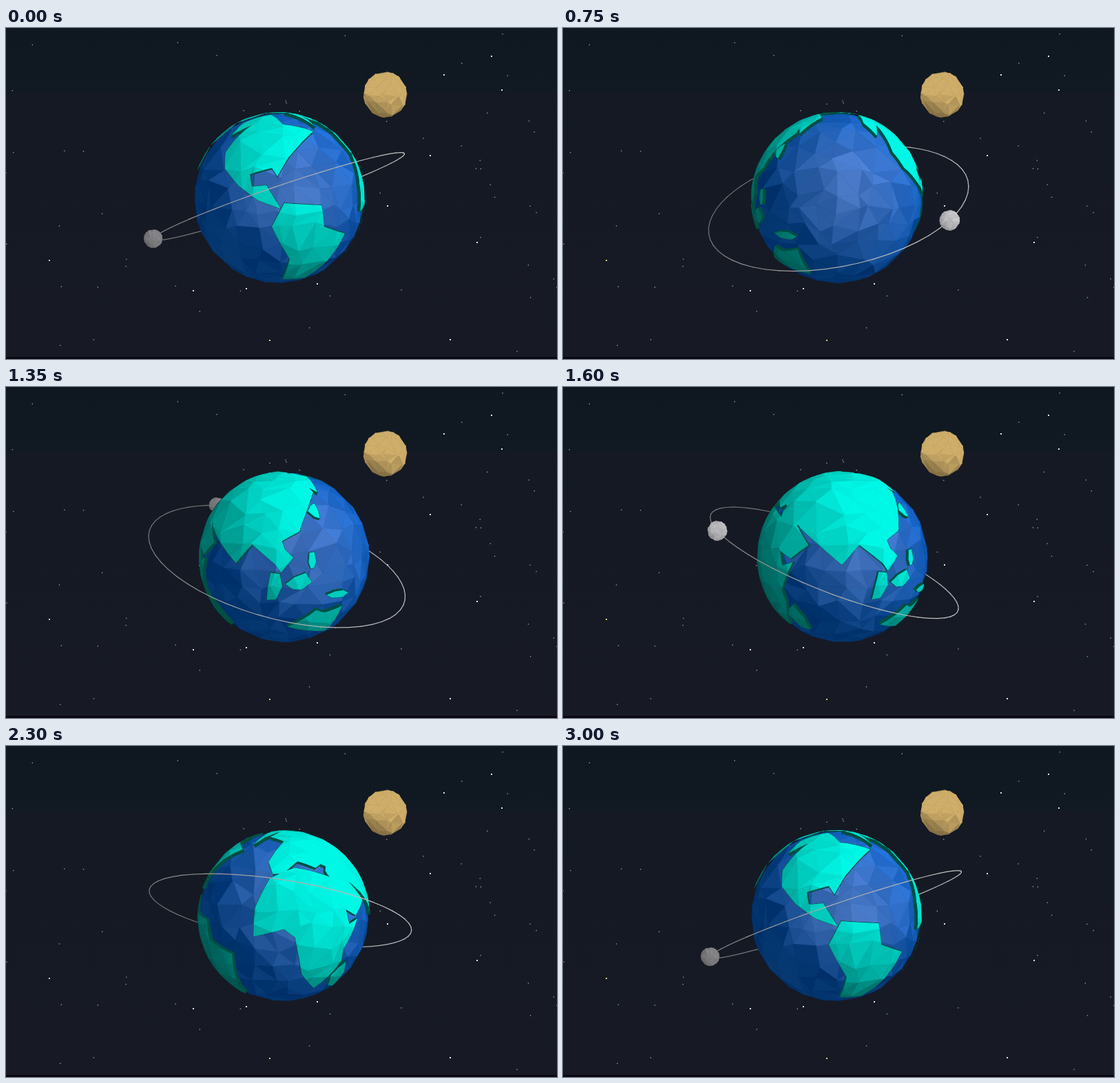
These frames come from a looping animation (800 by 480 pixels, 3050 ms). An HTML page with a canvas:

```html
<!DOCTYPE html>
<html lang="en">
<head>
<meta charset="utf-8">
<title>Low-poly Earth</title>
<style>
html, body { margin: 0; width: 100%; height: 100%; overflow: hidden; background: #131922; }
canvas { display: block; }
</style>
</head>
<body>
<canvas id="stage" width="800" height="480"></canvas>
<script>
const ctx = document.getElementById('stage').getContext('2d');
const { sin, cos, sqrt, min, max, PI, hypot } = Math;
const LOOP = 3050, TURN = 3000, STEP = 50;
const DIST = 950, ELEV = 0.118, CY = 247;
const SEA = 120.5, LAND = 124;
const RING = { x: 397, r: 189, tilt: 0.38, phase: -2 * PI / 3 };
const SUN = [0.55, 0.52, 0.65];

const dot = (a, b) => a[0] * b[0] + a[1] * b[1] + a[2] * b[2];
const scale = (p, k) => p.map(v => v * k);
const norm = p => scale(p, 1 / hypot(...p));
const mix = (a, b, k) => a.map((v, i) => v + (b[i] - v) * k);
const clamp = (v, lo, hi) => max(lo, min(hi, v));
const rgb = (r, g, b) => `rgb(${r | 0},${g | 0},${b | 0})`;
const noise = (p, seed) => {
  const v = sin(dot(p, [12.99, 78.23, 37.72]) + seed) * 43758.5;
  return v - Math.floor(v) - 0.5;
};
const pairs = text => text.split(' ').map(s => s.split(',').map(Number));

// Group space <-> camera space, for turn angle a
const cE = cos(ELEV), sE = sin(ELEV);
function toCam([x, y, z], a) {
  const c = cos(a), s = sin(a), depth = z * c - x * s;
  return [x * c + z * s, y * cE - depth * sE, depth * cE + y * sE];
}
function fromCam([x, y, z], a) {
  const c = cos(a), s = sin(a), depth = z * cE - y * sE;
  return [x * c - depth * s, y * cE + z * sE, x * s + depth * c];
}
function toScreen([x, y, z], cx) {
  const k = DIST / (DIST - z);
  return [cx + x * k, CY - y * k];
}
const angleAt = ms => 2 * PI * ms / TURN;
const earthX = a => 401 + 6 * sin(a + RING.phase);

// Faceted sphere: a subdivided octahedron with shifted corners
function sphere(levels, jitter) {
  const faces = [];
  const shift = p => norm(p.map((v, i) => v + jitter * noise(p, i * 7 + 1)));
  function split(a, b, c, n) {
    if (!n) {
      const pts = [a, b, c].map(shift);
      const mid = norm(pts[0].map((v, i) => v + pts[1][i] + pts[2][i]));
      faces.push({ pts, mid, rnd: noise(mid, 5) });
      return;
    }
    const ab = norm(mix(a, b, 0.5)), bc = norm(mix(b, c, 0.5)), ca = norm(mix(c, a, 0.5));
    split(a, ab, ca, n - 1);
    split(ab, b, bc, n - 1);
    split(ca, bc, c, n - 1);
    split(ab, bc, ca, n - 1);
  }
  for (const x of [-1, 1]) for (const y of [-1, 1]) for (const z of [-1, 1]) {
    const rest = [[0, y, 0], [0, 0, z]];
    if (x * y * z < 0) rest.reverse();
    split([x, 0, 0], ...rest, levels);
  }
  return faces;
}
const globe = sphere(3, 0.13), pebble = sphere(2, 0.3);

function polygon(points, color) {
  ctx.beginPath();
  points.forEach(p => ctx.lineTo(p[0], p[1]));
  ctx.closePath();
  ctx.fillStyle = ctx.strokeStyle = color;
  ctx.lineWidth = 0.7;
  ctx.fill();
  ctx.stroke();
}
function drawFaces(mesh, place, color) {
  for (const { pts, mid, rnd } of mesh) {
    const [a, b, c] = pts.map(place);
    const area = (b[0] - a[0]) * (c[1] - a[1]) - (b[1] - a[1]) * (c[0] - a[0]);
    if (area < 0) polygon([a, b, c], color(mid, rnd));
  }
}

// Lays a screen outline, seen at a given time, back onto the sphere
function outline(ms, points) {
  const a = angleAt(ms), cx = earthX(a);
  const pts = points.map(([sx, sy]) => {
    let k = 1, p;
    for (let i = 0; i < 6; i++) {
      const x = (sx - cx) / k, y = (CY - sy) / k;
      p = [x, y, sqrt(max(0, LAND * LAND - x * x - y * y))];
      k = DIST / (DIST - p[2]);
    }
    return fromCam(norm(p), a);
  });
  return pts.flatMap((p, i) =>
    [0, 0.25, 0.5, 0.75].map(k => norm(mix(p, pts[(i + 1) % pts.length], k))));
}
const coast = (ms, text) => outline(ms, pairs(text));
// Ragged island of six corners
const island = (ms, x, y, w, h) => outline(ms, Array.from({ length: 6 }, (_, i) => {
  const k = 1 + 0.6 * noise([x, y, i], 3), t = i * PI / 3;
  return [x + w * k * cos(t), y + h * k * sin(t)];
}));

const lands = [
  // North America, South America, Greenland
  coast(0, '327,156 345,138 385,126 402,140 446,150 410,188 394,215 386,203 354,212 357,230 378,228 399,262 366,250 338,229 318,204 319,180 345,150 357,141'),
  coast(0, '386,288 404,254 458,257 462,288 492,298 434,362 402,364 412,335'),
  coast(2650, '398,124 416,123 406,143'),
  // Africa, Madagascar
  coast(2000, '300,230 322,190 355,176 404,192 426,263 446,256 418,300 420,318 392,353 360,330 338,275 325,262 298,269'),
  island(2000, 425, 337, 12, 16),
  // Europe with Arabia, Asia, Far East
  coast(2000, '327,184 331,167 405,126 470,140 492,162 482,208 440,201 467,229 442,251 420,241 398,182 408,167 384,177 363,167 338,184'),
  coast(1600, '345,205 322,165 360,131 440,130 478,152 487,208 470,222 480,246 474,264 430,229 405,258'),
  coast(1100, '300,190 350,131 413,130 407,153 386,140 391,162 358,184 358,207 327,225 343,246 328,266 312,232'),
  // Pacific islands, Australia
  island(1100, 387, 180, 8, 12),
  island(1100, 369, 254, 6, 14),
  island(1100, 322, 286, 9, 20),
  island(1100, 350, 283, 15, 13),
  island(1100, 417, 304, 20, 6),
  coast(1100, '355,345 385,325 400,330 432,323 424,358 395,355')
];

function seaColor(n, rnd) {
  const d = max(0, dot(n, SUN) + rnd * 0.2), gloss = d * n[2] * n[2], v = rnd * 10;
  return rgb(2 + 15 * d + 70 * gloss + v, 52 + 52 * d + 28 * gloss + v, 110 + 102 * d + v);
}
function landColor(n, rnd) {
  const d = dot(n, SUN) + rnd * 0.13;
  const g = min(248, 118 + (d > 0 ? 145 : 60) * d);
  return rgb(0, g, g * 0.93);
}

function drawWalls(a, cx, front) {
  const edge = LAND * LAND / DIST;
  for (const land of lands) {
    const pts = land.map(p => toCam(p, a));
    pts.forEach((p, i) => {
      const q = pts[(i + 1) % pts.length], z = (p[2] + q[2]) / 2 * LAND;
      if (z > edge !== front || z < -40) return;
      const quad = [[p, SEA - 1], [q, SEA - 1], [q, LAND], [p, LAND]];
      polygon(quad.map(([v, r]) => toScreen(scale(v, r), cx)), '#004f43');
    });
  }
}
// Visible land tops; points beyond the horizon are pulled onto it
function landPath(a, cx) {
  const edge = LAND * LAND / DIST, rim = sqrt(LAND * LAND - edge * edge);
  const path = new Path2D();
  for (const land of lands) {
    const pts = land.map(p => scale(toCam(p, a), LAND));
    if (pts.every(p => p[2] < edge)) continue;
    pts.forEach((p, i) => {
      if (p[2] < edge) {
        const k = rim / hypot(p[0], p[1]);
        p = [p[0] * k, p[1] * k, edge];
      }
      path[i ? 'lineTo' : 'moveTo'](...toScreen(p, cx));
    });
    path.closePath();
  }
  return path;
}
function drawEarth(a) {
  const cx = earthX(a);
  const on = r => p => toScreen(scale(toCam(p, a), r), cx);
  const lit = color => (mid, rnd) => color(toCam(mid, a), rnd);
  drawWalls(a, cx, false);
  drawFaces(globe, on(SEA + 1), lit(seaColor));
  drawWalls(a, cx, true);
  ctx.save();
  ctx.clip(landPath(a, cx));
  drawFaces(globe, on(LAND + 0.5), lit(landColor));
  ctx.restore();
}

function ringPoint(g, a) {
  const { r, tilt, phase } = RING, u = cos(g) * cos(tilt), v = sin(g);
  return toCam([
    r * (u * sin(phase) + v * cos(phase)),
    -r * sin(tilt) * cos(g),
    r * (u * cos(phase) - v * sin(phase))
  ], a);
}
function drawRing(a, front) {
  const n = 60;
  ctx.lineWidth = 1.2;
  ctx.lineCap = 'round';
  for (let i = 0; i < n; i++) {
    const p = ringPoint(2 * PI * i / n, a), q = ringPoint(2 * PI * (i + 1) / n, a);
    if (p[2] + q[2] > 0 !== front) continue;
    const g = 155 + p[0] * 0.2 + p[2] * 0.1;
    ctx.strokeStyle = rgb(g, g, g);
    ctx.beginPath();
    ctx.moveTo(...toScreen(p, RING.x));
    ctx.lineTo(...toScreen(q, RING.x));
    ctx.stroke();
  }
}

// One lap per turn, slow at the loop point and fast halfway
const moonAngle = a => PI / 4 + a - 0.82 * sin(a) - 0.16 * (1 - cos(a));
function drawMoon(p, a) {
  const [x, y] = toScreen(p, RING.x), r = 12.6 * DIST / (DIST - p[2]);
  const base = clamp(190 + dot(p, SUN) * 0.6, 130, 198);
  drawFaces(pebble, v => {
    const c = toCam(v, a);
    return [x + c[0] * r, y - c[1] * r];
  }, (mid, rnd) => {
    const g = base * (0.86 + 0.16 * dot(toCam(mid, a), SUN) + rnd * 0.1);
    return rgb(g, g, g + 3);
  });
}
function drawSun() {
  drawFaces(pebble, p => [550.5 + 31.5 * p[0], 96.5 - 33 * p[1]], (n, rnd) => {
    const f = clamp(1.04 + 0.45 * n[1] + 0.12 * n[0] + rnd * 0.2, 0.66, 1);
    return rgb(207 * f, 174 * f, 106 * f);
  });
}

let seed = 11;
const random = () => (seed = seed * 16807 % 2147483647) / 2147483647;
const smallStars = Array.from({ length: 60 }, () => [random() * 800, random() * 470]);
const bigStars = pairs('720,90 705,41 636,68 616,185 684,311 452,371 272,381 349,378 645,452 554,258');
const warmStars = pairs('63,337 383,453');
const sky = ctx.createLinearGradient(0, 0, 0, 480);
sky.addColorStop(0, '#0f1821');
sky.addColorStop(0.193, '#111922');
sky.addColorStop(0.195, '#141923');
sky.addColorStop(1, '#171a25');

function dots(list, size, color) {
  ctx.fillStyle = color;
  list.forEach(([x, y]) => ctx.fillRect(x - size / 2, y - size / 2, size, size));
}
function drawSky() {
  ctx.fillStyle = sky;
  ctx.fillRect(0, 0, 800, 480);
  ctx.fillStyle = '#08080e';
  ctx.fillRect(0, 477, 800, 3);
  dots(smallStars, 1.3, '#a9adb3');
  dots(bigStars, 2, '#e4e6e8');
  dots(warmStars, 2, '#d9d184');
}

function draw(now) {
  const a = angleAt(Math.floor(now % LOOP / STEP) * STEP);
  const moon = ringPoint(moonAngle(a), a);
  drawSky();
  drawRing(a, false);
  if (moon[2] < 0) drawMoon(moon, a);
  drawEarth(a);
  drawRing(a, true);
  if (moon[2] >= 0) drawMoon(moon, a);
  drawSun();
}

let start;
function tick(now) {
  start ??= now;
  draw(max(0, now - start));
  requestAnimationFrame(tick);
}
draw(0);
requestAnimationFrame(tick);
</script>
</body>
</html>
```
